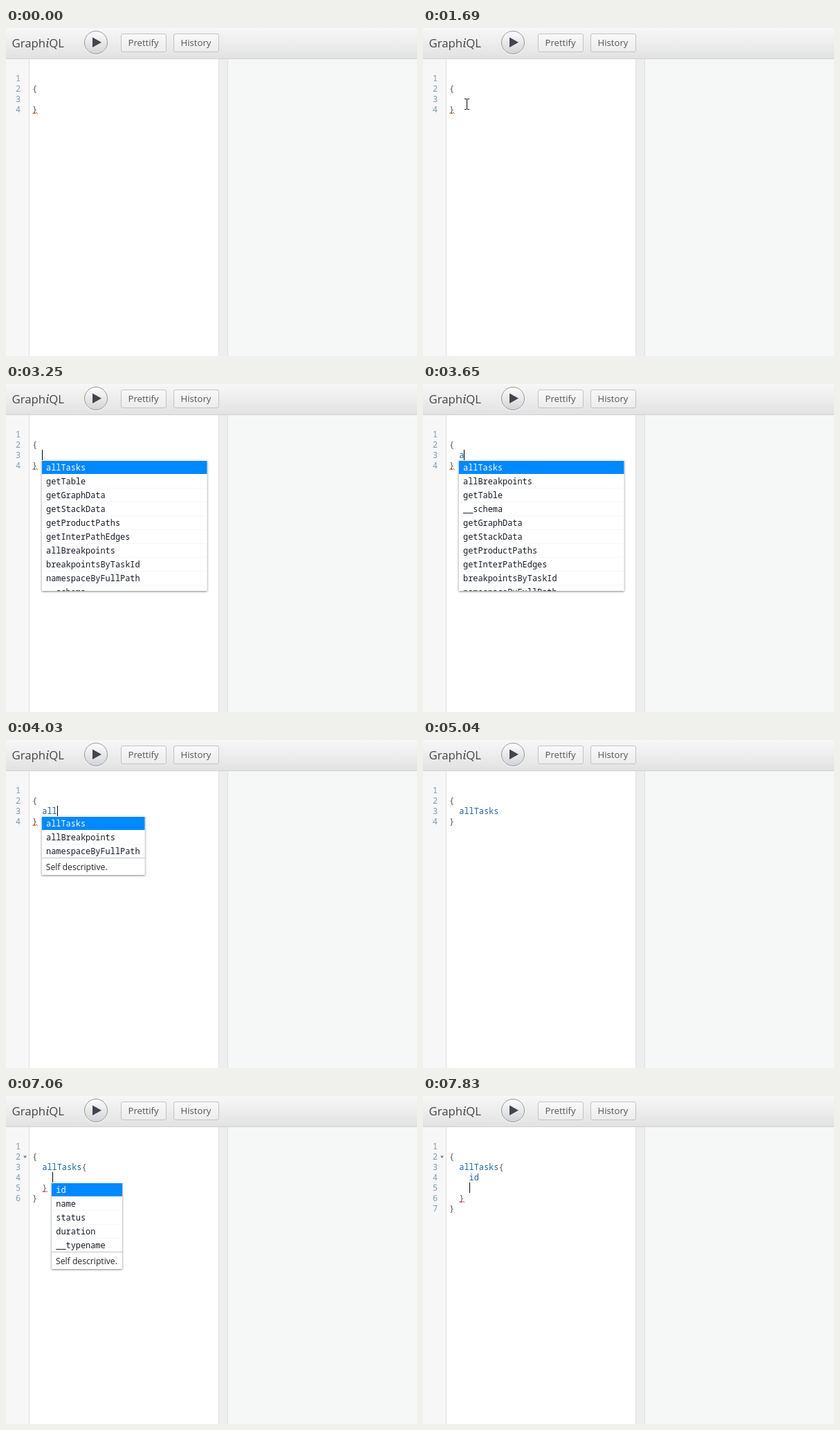
An HTML page that plays this animation: 594 by 474 pixels, repeating every 8 s.

```html
<!DOCTYPE html>
<html lang="en">
<head>
<meta charset="utf-8">
<title>GraphiQL typing</title>
<style>
html, body { margin: 0; width: 100%; height: 100%; overflow: hidden; background: #fff; }
svg { display: block; }
.ui { font-family: "Open Sans", "Noto Sans", sans-serif; font-size: 13.2px; fill: #555; }
.logo { font-size: 16.8px; fill: #444; }
.logo tspan { font-family: "Noto Serif", serif; font-style: italic; }
.info { font-size: 12.2px; fill: #222; }
.code { font-family: "Noto Sans Mono", "DejaVu Sans Mono", monospace; font-size: 11.9px; white-space: pre; fill: #555; }
.field { fill: #1f61a0; }
.number { fill: #7c9cb2; }
.hint { fill: #141823; }
.active { fill: #fff; }
.popup { filter: drop-shadow(0 1px 1.5px rgba(0,0,0,.5)); }
</style>
</head>
<body>
<svg width="594" height="474" viewBox="0 0 594 474">
  <defs>
    <linearGradient id="bar" x2="0" y2="1"><stop stop-color="#f7f7f7"/><stop offset="1" stop-color="#e2e2e2"/></linearGradient>
    <linearGradient id="button" x2="0" y2="1"><stop stop-color="#f9f9f9"/><stop offset="1" stop-color="#ececec"/></linearGradient>
    <linearGradient id="round" x2="0" y2="1"><stop stop-color="#fdfdfd"/><stop offset="1" stop-color="#d2d3d6"/></linearGradient>
  </defs>
  <rect width="594" height="474" fill="#fff"/>
  <rect y="45" width="33" height="429" fill="#f7f7f7"/>
  <rect x="33" y="45" width="1" height="429" fill="#ddd"/>
  <rect x="307" y="45" width="14" height="429" fill="#e0e0e0"/>
  <rect x="308" y="45" width="12" height="429" fill="#eee"/>
  <rect x="321" y="45" width="273" height="429" fill="#f6f8f8"/>
  <rect width="594" height="44" fill="url(#bar)"/>
  <rect y="44" width="594" height="1" fill="#d0d0d0"/>
  <text class="ui logo" x="8.5" y="28">Graph<tspan>i</tspan>QL</text>
  <circle cx="130" cy="22" r="17" fill="#fff"/>
  <circle cx="130" cy="21" r="16.5" fill="url(#round)" stroke="#979797"/>
  <path d="M125 13.5L138 20.7L125 28z" fill="#444450"/>
  <g fill="url(#button)" stroke="#c2c2c2">
    <rect x="166.5" y="8.5" width="65" height="26" rx="2.5"/>
    <rect x="242.5" y="8.5" width="65" height="26" rx="2.5"/>
  </g>
  <text class="ui" x="176.5" y="26">Prettify</text>
  <text class="ui" x="252.5" y="26">History</text>
  <g id="editor"></g>
  <path id="pointer" fill="none" stroke="#000" d="M-3.5-7.5h3M.5-7.5h3M0-7V7M-3.5 7.5h3M.5 7.5h3"/>
</svg>
<script>
const LOOP = 8000, CHAR = 7.15, LEFT = 38, TOP = 65, LINE = 15;
const editor = document.getElementById('editor');
const pointer = document.getElementById('pointer');
const colX = col => LEFT + col * CHAR;

const getters = ['getGraphData', 'getStackData', 'getProductPaths', 'getInterPathEdges'];
const popup = (row, col, width, items, info = true) => ({ row, col, width, items, info });
const fieldHints = items => popup(2, 2, 239, items, false);
const typed = text => ['', '{', '  ' + text, '}'];

// Each step changes only the parts it names.
const steps = [
  { t: 0, code: typed(''), mark: [3, 0, 1, '#b06a3c'], caret: null, hints: null, fold: false },
  { t: 1940, caret: [2, 2] },
  { t: 2470, caret: null },
  { t: 3030, caret: [2, 2] },
  { t: 3250, hints: fieldHints(['allTasks', 'getTable', ...getters, 'allBreakpoints',
      'breakpointsByTaskId', 'namespaceByFullPath', '__schema']) },
  { t: 3650, code: typed('a'), caret: [2, 3], hints: fieldHints(['allTasks', 'allBreakpoints', 'getTable',
      '__schema', ...getters, 'breakpointsByTaskId', 'namespaceByFullPath']) },
  { t: 3880, code: typed('al'), caret: [2, 4], hints: popup(2, 2, 226, ['allTasks', 'allBreakpoints',
      'namespaceByFullPath', 'getExternalPaths', 'getInterPathEdgesByInternalIds']) },
  { t: 4030, code: typed('all'), caret: [2, 5], hints: popup(2, 2, 149, ['allTasks', 'allBreakpoints', 'namespaceByFullPath']) },
  { t: 4570, code: typed('allTasks'), caret: [2, 10], mark: null, hints: null },
  { t: 5040, caret: null },
  { t: 5120, mark: [2, 2, 8, '#4a5a78'] },
  { t: 5580, caret: [2, 10] },
  { t: 5660, code: typed('allTasks{}'), caret: [2, 11] },
  { t: 6060, code: ['', '{', '  allTasks{', '', '  }', '}'], caret: [3, 4] },
  { t: 6450, hints: popup(3, 4, 102, ['id', 'name', 'status', 'duration', '__typename']) },
  { t: 6520, mark: [4, 2, 1, '#d22'], fold: true },
  { t: 6590, caret: null },
  { t: 7060, caret: [3, 4] },
  { t: 7450, code: ['', '{', '  allTasks{', '    id', '  }', '}'], caret: [3, 6], hints: null },
  { t: 7830, code: ['', '{', '  allTasks{', '    id', '', '  }', '}'], caret: [4, 4], mark: [5, 2, 1, '#d22'] }
];
const states = [];
steps.forEach((step, i) => states.push({ ...states[i - 1], ...step }));

const text = (cls, x, y, body) => `<text class="${cls}" x="${x}" y="${y}">${body}</text>`;
const rect = (x, y, w, h, fill) => `<rect x="${x}" y="${y}" width="${w}" height="${h}" fill="${fill}"/>`;

function codeLine(line, row) {
  const y = TOP + row * LINE + 12;
  const words = line.match(/\w+|[{}]/g) || [];
  return text('code number', 14, y, row + 1) + words.map(word =>
    text(/\w/.test(word) ? 'code field' : 'code', colX(line.indexOf(word)), y, word)).join('');
}

function squiggle([row, col, chars, color]) {
  const y = TOP + row * LINE + 14;
  let d = `M${colX(col)} ${y}`;
  for (let x = 0; x < chars * CHAR - 2; x += 4) d += 'l2-2l2 2';
  return `<path d="${d}" fill="none" stroke="${color}" stroke-width=".9"/>`;
}

function hintBox({ row, col, width, items, info }) {
  const x = colX(col) - .6, y = TOP + (row + 1) * LINE;
  const list = items.length * 20;
  const height = Math.min(189, list + (info ? 25 : 0));
  const rows = items.map((item, i) =>
    rect(0, i * 20, width, 1, i ? '#f7f7f7' : '#fff') +
    (i ? '' : rect(0, 1, width, 19, '#08f')) +
    text('code hint' + (i ? '' : ' active'), 6.3, i * 20 + 15, item)).join('');
  const note = info ? rect(0, list, width, 1, '#c4c4c4') + text('ui info', 6, list + 18, 'Self descriptive.') : '';
  return `<g class="popup">${rect(x, y, width, height, '#fff')}</g>
    <svg x="${x}" y="${y}" width="${width}" height="${height}">${rows}${note}</svg>`;
}

function draw({ code, mark, caret, hints, fold }) {
  editor.innerHTML = code.map(codeLine).join('') +
    (fold ? '<path d="M25 86.5h5l-2.5 3.5z" fill="#777"/>' : '') +
    (mark ? squiggle(mark) : '') +
    (caret ? rect(Math.round(colX(caret[1])), TOP + caret[0] * LINE, 1, LINE, '#000') : '') +
    (hints ? hintBox(hints) : '');
}

// The pointer glides in to line 3, clicks, then leaves to the lower right.
function pointerAt(t) {
  if (t < 1000 || t >= 2330) return null;
  const step = 78;
  if (t < 1690) {
    const k = (1 - Math.floor((t - 1000) / step) / 9) ** 2;
    return [63 + 156 * k, 110 + 327 * k];
  }
  if (t < 1770) return [63, 110];
  if (t < 1940) return [63, 108];
  const k = ((Math.floor((t - 1940) / step) + 1) / 5) ** 1.5;
  return [63 + 414 * k, 108 + 267 * k];
}

let shown;
function frame(now) {
  const t = now % LOOP;
  const state = states.findLast(s => s.t <= t);
  if (state !== shown) draw(shown = state);
  const p = pointerAt(t);
  pointer.style.display = p ? '' : 'none';
  if (p) pointer.setAttribute('transform', `translate(${Math.round(p[0]) + .5} ${Math.round(p[1])})`);
  requestAnimationFrame(frame);
}
frame(0);
</script>
</body>
</html>
```
